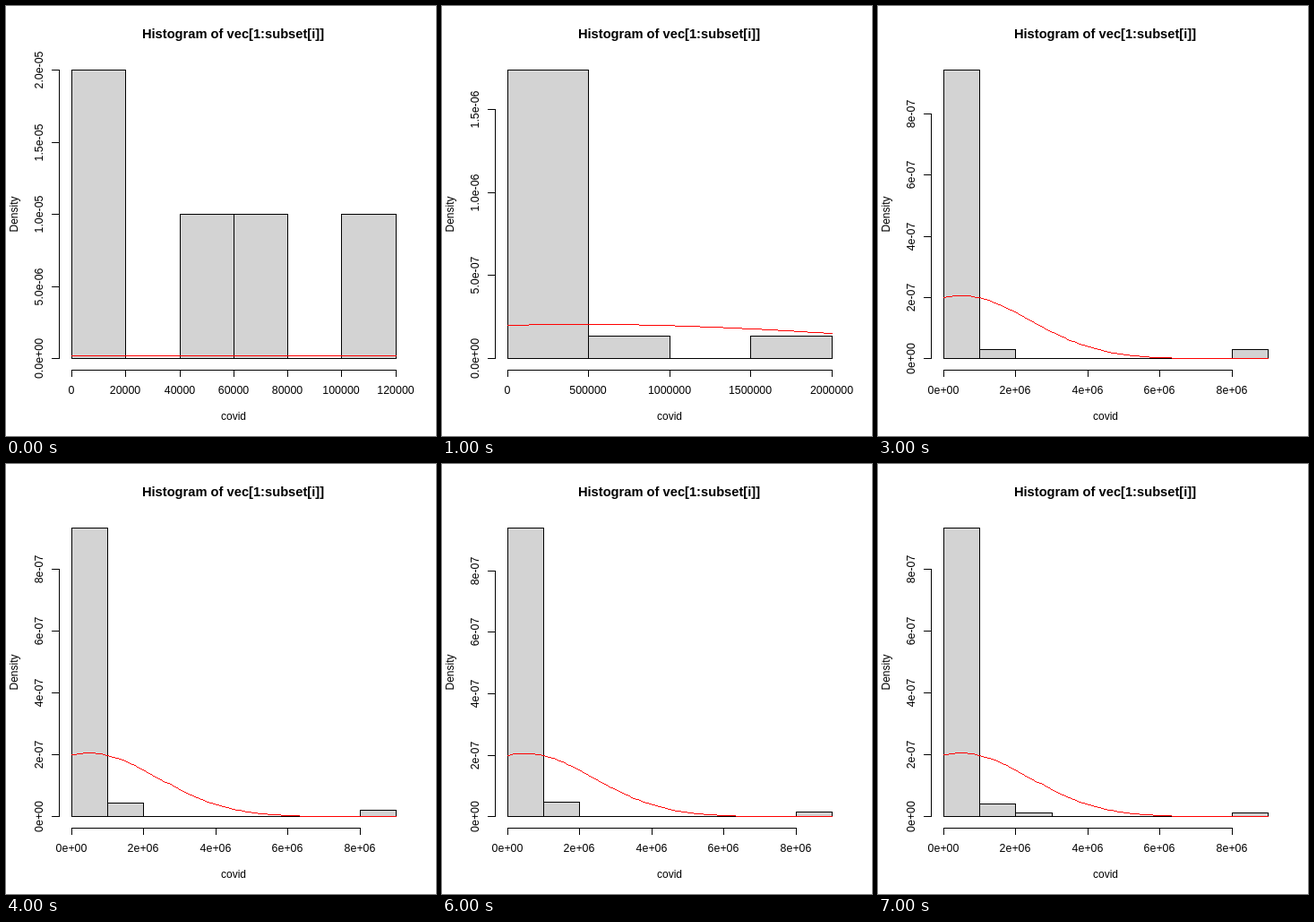
An HTML page with a canvas that plays this animation: 480 px wide and 480 px high, repeating every 8 s.

```html
<!DOCTYPE html>
<html lang="en">
<head>
<meta charset="utf-8">
<title>Growing histogram</title>
<style>
  html, body { margin: 0; width: 100%; height: 100%; overflow: hidden; background: #fff; }
  canvas { display: block; width: 480px; height: 480px; }
</style>
</head>
<body>
<canvas id="plot" width="480" height="480"></canvas>
<script>
const ctx = document.getElementById('plot').getContext('2d');
const STEP = 1000;
const FONT = '"Liberation Sans", Arial, sans-serif';

// Data area inside the plot margins.
const LEFT = 73.51, WIDTH = 361.78, BASE = 393.69, HEIGHT = 321.78;
const AXIS_X = 59, AXIS_Y = 406, TICK = 8;

// Normal density drawn over the bars.
const MEAN = 475000, SD = 1.935e6;
const density = x => Math.exp(-(((x - MEAN) / SD) ** 2) / 2) / (SD * Math.sqrt(2 * Math.PI));

const millions = counts => ({
  bin: 1e6, counts, xStep: 2e6, yStep: 2e-7,
  xLabels: ['0e+00', '2e+06', '4e+06', '6e+06', '8e+06'],
  yLabels: ['0e+00', '2e-07', '4e-07', '6e-07', '8e-07']
});

const samples = [
  {
    bin: 20000, counts: [2, 0, 1, 1, 0, 1], xStep: 20000, yStep: 5e-6,
    xLabels: ['0', '20000', '40000', '60000', '80000', '100000', '120000'],
    yLabels: ['0.0e+00', '5.0e-06', '1.0e-05', '1.5e-05', '2.0e-05']
  },
  {
    bin: 500000, counts: [13, 1, 0, 1], xStep: 500000, yStep: 5e-7,
    xLabels: ['0', '500000', '1000000', '1500000', '2000000'],
    yLabels: ['0.0e+00', '5.0e-07', '1.0e-06', '1.5e-06']
  },
  millions([23, 1, 0, 0, 0, 0, 0, 0, 1]),
  millions([33, 1, 0, 0, 0, 0, 0, 0, 1]),
  millions([42, 2, 0, 0, 0, 0, 0, 0, 1]),
  millions([52, 2, 0, 0, 0, 0, 0, 0, 1]),
  millions([61, 3, 0, 0, 0, 0, 0, 0, 1]),
  millions([70, 3, 1, 0, 0, 0, 0, 0, 1])
];

function box(x, y, w, h, color = '#000') {
  ctx.fillStyle = color;
  ctx.fillRect(x, y, w, h);
}

function label(text, x, y, { size = 12, weight = 'normal', upright = true } = {}) {
  ctx.save();
  ctx.translate(x, y);
  if (!upright) ctx.rotate(-Math.PI / 2);
  ctx.font = `${weight} ${size}px ${FONT}`;
  ctx.textAlign = 'center';
  ctx.fillStyle = '#000';
  ctx.fillText(text, 0, 0);
  ctx.restore();
}

function drawBars({ bin, counts }, total, px, py) {
  counts.forEach((count, i) => {
    const x0 = px(i * bin), x1 = px((i + 1) * bin);
    const y0 = py(count / total / bin), y1 = py(0);
    box(x0, y0, x1 - x0 + 1, y1 - y0 + 1);
    if (count) box(x0 + 1, y0 + 1, x1 - x0 - 1, y1 - y0 - 1, '#d3d3d3');
  });
}

function drawAxes({ xStep, yStep, xLabels, yLabels }, px, py) {
  const xEnd = px(xStep * (xLabels.length - 1));
  const yEnd = py(yStep * (yLabels.length - 1));
  box(px(0), AXIS_Y, xEnd - px(0) + 1, 1);
  box(AXIS_X, yEnd, 1, py(0) - yEnd + 1);
  xLabels.forEach((text, i) => {
    const x = px(i * xStep);
    box(x, AXIS_Y, 1, TICK);
    label(text, x, 433, { size: 12.4 });
  });
  yLabels.forEach((text, i) => {
    const y = py(i * yStep);
    box(AXIS_X - TICK, y, TICK, 1);
    label(text, 41, y + 0.5, { size: 12.4, upright: false });
  });
}

// Unsmoothed polyline through 101 points, one pixel per column.
function drawCurve(range, px, py) {
  const point = i => [px(range * i / 100), py(density(range * i / 100))];
  for (let i = 0; i < 100; i++) {
    const [x0, y0] = point(i), [x1, y1] = point(i + 1);
    for (let x = x0; x <= x1; x++) {
      box(x, Math.round(y0 + (y1 - y0) * (x - x0) / (x1 - x0)), 1, 1, '#f00');
    }
  }
}

function draw(sample) {
  const { bin, counts } = sample;
  const total = counts.reduce((a, b) => a + b);
  const range = bin * counts.length;
  const peak = counts[0] / total / bin;
  const px = v => Math.floor(LEFT + WIDTH * v / range);
  const py = v => Math.floor(BASE - HEIGHT * v / peak);

  box(0, 0, 480, 480, '#fff');
  label('Histogram of vec[1:subset[i]]', 253.5, 36, { size: 14.7, weight: 'bold' });
  label('covid', 254, 462);
  label('Density', 13, 232.5, { upright: false });
  drawBars(sample, total, px, py);
  drawAxes(sample, px, py);
  drawCurve(range, px, py);
}

let shown = -1;
const start = performance.now();

function tick() {
  const index = Math.floor((performance.now() - start) / STEP) % samples.length;
  if (index !== shown) draw(samples[shown = index]);
  requestAnimationFrame(tick);
}
tick();
</script>
</body>
</html>
```
